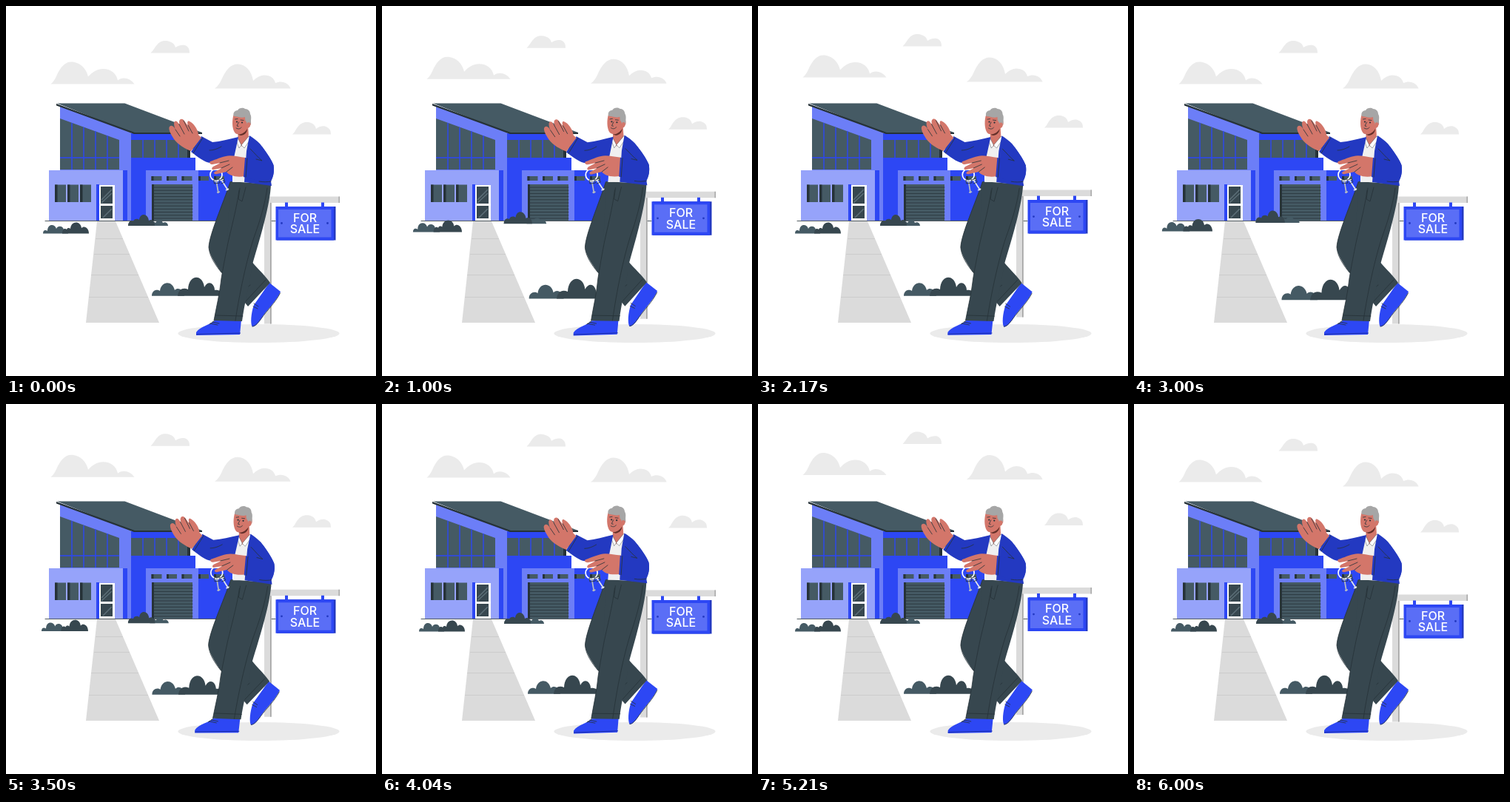
An HTML page that plays this animation: 500x500 px, repeating every 6040 ms.

```html
<!DOCTYPE html>
<html lang="en">
<head>
<meta charset="utf-8">
<title>House for sale</title>
<style>
  html, body { margin: 0; width: 100%; height: 100%; overflow: hidden; background: #fff; }
  svg { display: block; width: 100vw; height: 100vh; }
  .blue { fill: #2d47f4; }
  .soft { fill: #6c7ef7; }
  .pale { fill: #96a3fa; }
  .jacket { fill: #2339c1; }
  .slate { fill: #455a64; }
  .dark { fill: #37474f; }
  .ink { fill: #263238; }
  .skin { fill: #d3766a; }
  .cloud { fill: #ebebeb; }
  .grey { fill: #dbdbdb; }
  .line { fill: none; stroke: #263238; stroke-width: .8; stroke-linecap: round; stroke-linejoin: round; }
  .bars { fill: none; stroke: #2d47f4; stroke-width: 1.4; }
  text { font: 500 16px Inter, sans-serif; fill: #fff; text-anchor: middle; }
</style>
</head>
<body>
<svg viewBox="0 0 500 500">
  <g id="clouds" class="cloud">
    <path d="M60.500 105.500C64 103 66 99 68 95C73 83 80 75.500 88 75.500C100 75.500 109 85 111 95.500C117 89 124 85 131 85C142 85 149 91 151 100.500C157 95 168 97 173.500 105.500Z"/>
    <path d="M282 111.500C286 109 289 104 291 100C297 86 304 78.500 313 78.500C324 78.500 332 88 334 101C339 96 344 93.500 349 93.500C357 93.500 362 97 364 104C373 100 382 104 384.500 111.500Z"/>
    <path d="M195.500 63.500C198 61 200 58 202 55C206 49 211 46.500 216 47C223 47.500 228 51 229 56C235 52 241 52 244 54C247 56 248 59 248 63.500Z"/>
    <path d="M387 173.500C390 171 391 168 393 165C397 159 402 156.500 408 157C414 157.500 418 161 419 166C425 161.500 431 161.500 434 164C438 166 439 169 439 173.500Z"/>
  </g>

  <path class="grey" d="M123 291H148L207 428H108Z"/>
  <path d="M121 314.500H158M119 335.500H167M115 363.500H179M112 393.500H192" fill="none" stroke="#c9c9c9" stroke-width=".8"/>

  <path class="line" d="M53 290.500H364"/>
  <path class="soft" d="M73 134L169 171V290H158V222H73Z"/>
  <path class="slate" d="M73 152L153 181V221H73Z"/>
  <path class="bars" d="M89 158V221M105 164V221M121 169V221M137 175V221M73 205H153"/>
  <path class="blue" d="M169 172H249V205H256V222H306V290H169Z"/>
  <path class="slate" d="M169 181H248V205H169Z"/>
  <path class="bars" d="M185 181V205M201 181V205M217 181V205M233 181V205"/>
  <path class="ink" d="M245 172H249V205H245Z"/>
  <path class="slate" d="M69 131.500H160.500L265 171V173H174Z"/>
  <path class="ink" d="M68 132L174 171H265V173H173L68 134.500Z"/>

  <path class="pale" d="M58 222H158V290H58Z"/>
  <path class="blue" d="M158 222H164V290H158Z"/>
  <g id="windows"></g>
  <path class="blue" d="M122 241H147V290H122Z"/>
  <path fill="#fff" d="M126 241.500H147V290H126Z"/>
  <path class="dark" d="M128 244H144V267H128ZM128 270H144V287H128Z"/>
  <path d="M129 262L143 248M129 266L143 253M131 286L143 274" stroke="#5c6f78" stroke-width="1.500"/>
  <path class="soft" d="M189 222H260V290H189Z"/>
  <g id="vents"></g>
  <path class="slate" d="M197 241H252V290H197Z"/>
  <path class="ink" d="M197 241H200V290H197Z"/>
  <path id="slats" class="line"/>

  <g id="bushes">
    <path class="slate" d="M50 307.500C50 303 53 302 56 304C56 294 66 294 68 301C70 296 77 297 78 302C82 301 84 304 84 307.500Z"/>
    <path class="dark" d="M76 307.500C76 301 80 300 82 302C83 299 86 300 87 301C88 289.500 101 290 102 300C106 296 112 300 112 307.500Z"/>
    <path class="slate" d="M194 297C195 292 199 290 202 293C205 288 211 289 212 293C216 291 219 294 219 297Z"/>
    <path class="dark" d="M165 297C165 291 169 289 172 291C173 287 178 287 180 289C181 279 192 280 193 290C198 287 201 292 201 297Z"/>
    <path class="slate" d="M197 391.800C197 384 204 382 208 385C210 371 225 371 228 384C233 379 240 384 241 391.800Z"/>
    <path class="dark" d="M232 391.800C233 383 239 380 246 383C247 362 266 362 268 380C274 369 282 376 282 384C289 383 293 387 295 391.800Z"/>
  </g>

  <ellipse class="cloud" cx="341.500" cy="442.500" rx="109" ry="12.500"/>

  <g id="sign">
    <path class="grey" d="M345 257.500H451V266H358.500V429.500H349V266H345Z"/>
    <path d="M357 266H358.700V429.500H357ZM449.500 257.500H451V266H449.500Z" fill="#a6a6a6"/>
    <path class="blue" d="M377 265.500H381V272H377ZM426 265.500H430V272H426Z"/>
    <path class="jacket" d="M366 271H445.500V316.500H366Z"/>
    <path class="blue" d="M364.500 271H443V316.500H364.500Z"/>
    <path d="M368 275H439.500V312.500H368Z" fill="#5a6ef6"/>
    <circle class="jacket" cx="372.500" cy="293.500" r="1.400"/><circle class="jacket" cx="434.500" cy="293.500" r="1.400"/>
    <text x="404" y="291.800">FOR</text>
    <text x="404" y="307.300">SALE</text>
  </g>

  <g id="man">
    <path class="blue" d="M356 374L371 386C366 398 355 408 348 418C343 426 338 433 333 433.500C330 430 331 415 335 404Z"/>
    <path class="line" d="M370.500 388C364 401 353 411 346 421C341 428 337 433 333 433M335 402L341 406M334 406L340 409"/>
    <path class="dark" d="M303 238C293 268 275 308 274 326C275 341 293 364 327 406L357 374C347 360 336 352 330 342L322 246Z"/>
    <path class="line" d="M323 400L351 370M318 387L330 377"/>
    <path class="blue" d="M282 425C276 431 262 433 257 441V445L316 444L318 424Z"/>
    <path d="M257 443.500L317 442" fill="none" stroke="#1d30a8" stroke-width="1"/>
    <path class="line" d="M276 429L286 431M279 427L288 429M275 430L281 426"/>
    <path class="dark" d="M303 237L358 241C357 268 344 312 333 349C329 376 322 403 319 426L281 425C284 408 289 388 291 368L299 320Z"/>
    <path class="line" d="M303 238C293 268 275 308 274 326C275 338 282 349 291 360M281 425C284 408 289 388 291 368C294 350 297 335 300 320C304 302 312 272 315 249M310 425C316 385 326 340 335 313C343 291 350 268 353 246M316 246L314 261L319 264L324 245M283 418L320 419"/>

    <path fill="#f0f0f0" d="M311 180L328 178L324 238H306Z"/>
    <path class="skin" d="M314 168L327 160L328 178L318 190L313 180Z"/>
    <path fill="#fff" stroke="#263238" stroke-width=".4" d="M313 178L318 188L328 176L331 179L322 192L318 188L315 192L311 181Z"/>
    <path class="skin" d="M307 149C305 158 306 168 310 172C316 176 324 171 327 164L331 160C332 153 327 145 320 143C313 142 308 145 307 149Z"/>
    <path fill="#632f29" d="M313 173.500C318 174 323 171 326 166C326 171 322 175 317 175Z"/>
    <path fill="#a6a6a6" d="M308 149C306 145 309 141 313 141C315 137 321 137 323 139C327 139 330 142 330 146C332 149 331 153 331 156C331 160 329 163 327 165L325 157C323 155 323 153 323 150C318 152 312 149 308 149Z"/>
    <path class="skin" d="M326 158C329 156 331 159 330 162C329 165 326 166 325 163Z"/>
    <circle class="ink" cx="312" cy="156.500" r="1.100"/><circle class="ink" cx="319" cy="157.500" r="1.100"/>
    <path class="line" d="M309.500 153L313 152.500M317 154L321 154.500M314.500 157L312 162L314 162.500M311 165C314 167 317 166 318 164"/>

    <path class="jacket" d="M329 175C334 178 339 182 343 186C351 196 358 206 361.500 215C363 224 361 232 358 237L359 243L322 238L325 196Z"/>
    <path class="jacket" d="M314 177C301 180 290 183 279 184L264 176L250 197C258 203 269 212 276 212C286 211 297 207 308 205Z"/>
    <path class="line" d="M261 179L254 191L249 196M266 178L253 199M291 190C284 194 279 195 275 195"/>

    <path class="skin" d="M264 178L250 196C242 193 232 187 227 180C222 172 219 166 221 163C224 160 227 163 229 167C225 157 228 154 231 156L235 161C232 153 237 151 240 154L246 162C244 155 246 154 250 157C255 160 260 169 260 174Z"/>
    <path class="line" d="M229 167L235 176M234 160L241 173M240 155L247 169M246 161L252 172"/>

    <g fill="none" stroke="#fff" stroke-width="1.700">
      <circle cx="284" cy="228" r="8"/>
      <path stroke="#b7bdc2" d="M284 235L287 253M281 237H287M285 252L289 251"/>
      <path stroke="#e4e7e9" d="M291 235L300 249M288 236L294 234M297 249L301 247"/>
    </g>
    <path class="line" stroke-width=".4" d="M281 235L288 234L289 239L282 240ZM289 235L294 233L296 238L291 240"/>
    <path class="skin" d="M324 205C314 204 304 201 297 203C288 205 280 209 276 210C274 212 276 214 279 214L290 212L280 217C277 219 278 222 281 221L292 219L282 224C280 226 282 228 285 227L298 224C301 229 311 232 323 230Z"/>
    <path class="line" d="M289 212L301 209M291 219L302 214M298 224L306 218"/>
    <path class="jacket" d="M346 190C353 200 359 208 361.500 215C363 224 361 232 357 236C345 239 333 234 321 231L323 205C332 207 338 208 343 209Z"/>
    <path class="line" d="M326 206L324 231M330 193C337 200 340 204 346 209L338 207M358 237C353 238 348 238 342 237"/>
  </g>
</svg>
<script>
  const get = id => document.getElementById(id);
  const rect = (cls, x, y, w, h) => `<rect class="${cls}" x="${x}" y="${y}" width="${w}" height="${h}"/>`;

  get("windows").innerHTML = [66, 83, 100].map(x =>
    rect("slate", x, 241.5, 15, 23.5) + rect("ink", x, 241.5, 3.5, 23.5)).join("");
  get("vents").innerHTML = [196.5, 217, 237.5, 260, 281].map(x =>
    rect("slate", x, 230, 14, 6) + rect("ink", x, 230, 3, 6)).join("");
  get("slats").setAttribute("d",
    Array.from({ length: 11 }, (_, i) => `M200 ${245 + i * 4.2}H252`).join(""));

  const LOOP = 6040, FPS = 24, LAST = 144;

  // Linear interpolation through [position, value] stops.
  function tween(stops, p) {
    const i = Math.max(1, stops.findIndex(s => s[0] >= p));
    const [a, from] = stops[i - 1], [b, to] = stops[i];
    return from + (to - from) * (p - a) / (b - a);
  }

  const FLOAT = [[0, 0], [.5, -10], [1, 0]];
  const SWAY = [[0, 0], [.25, 1], [.75, -1], [1, 0]];
  const BEAT = [[0, 1], [.1, 1.1], [.3, 1], [.4, 1], [.5, 1.1], [.6, 1], [1, 1]];

  function draw(ms) {
    const step = Math.min(LAST, Math.floor((ms % LOOP + 5) * FPS / 1000));
    const time = step / FPS;
    const fast = time / 1.5 % 1, slow = time / 6 % 1;
    const lift = `translate(0 ${tween(FLOAT, fast)})`;
    get("clouds").setAttribute("transform", lift);
    get("sign").setAttribute("transform", lift);
    get("man").setAttribute("transform", `rotate(${tween(SWAY, fast)} 295.5 292)`);
    get("bushes").setAttribute("transform",
      `translate(172 337) scale(${tween(BEAT, slow)}) translate(-172 -337)`);
  }

  const start = performance.now();
  function tick() {
    draw(performance.now() - start);
    requestAnimationFrame(tick);
  }
  tick();
</script>
</body>
</html>
```
